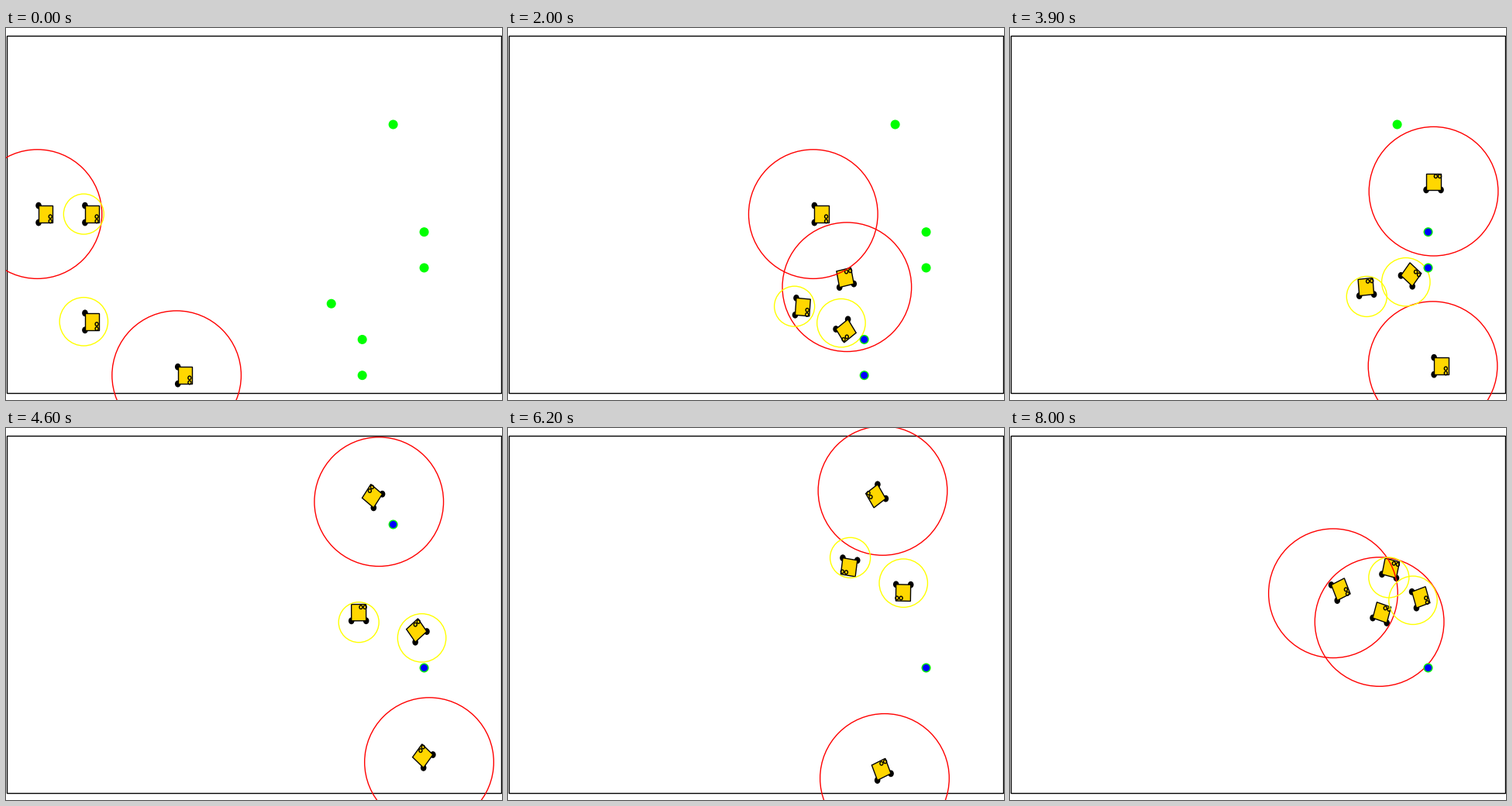
These frames come from a looping animation (640x480 px, 8100 ms). A matplotlib script:

```python
import matplotlib.pyplot as plt
import numpy as np
from matplotlib.animation import FuncAnimation
from matplotlib.patches import Circle, Ellipse, Polygon, Rectangle

FRAMES, INTERVAL = 81, 100
WIDTH, HEIGHT = 640, 480
SCALE = np.array([19.965, 23.12])  # pixels per world unit
LEFT, BOTTOM = 0.5, 8.7            # world origin in pixels
SCOUT_RING, PICKER_RINGS = 83.3, (26, 31.2)
LIME, BLUE, GOLD = "#00ff00", "#0000ff", "#ffd700"

# Each robot drives through one pose (x, y, heading in degrees) per key step.
KEY_STEPS = [0, 9, 20, 39, 54, 70, 80]
SCOUT_A = [(2, 10, 0), (10.28, 10, 0), (19.7, 10, 0), (27.35, 11.27, 90),
           (23.95, 18.09, 2), (21.13, 11.6, -80), (20.86, 11.16, 24)]
SCOUT_B = [(11, 1, 0), (18.56, 2.67, 90), (21.88, 5.93, 102), (27.3, 1.52, 0),
           (26.89, 1.73, -114), (23.37, 7.6, 90), (23.85, 9.57, 73)]
PICKER_A = [(5, 10, 0), (14.93, 10, 0), (18.49, 4.85, -4.5), (23.03, 5.4, 95),
            (22.78, 14.07, 91), (23.28, 10.96, 21), (24.46, 12.04, 77)]
PICKER_B = [(5, 4, 0), (14.84, 4, 0), (21.51, 3.92, -55), (25.56, 6.21, 51),
            (25.69, 12.1, 90), (26.21, 10.77, 20), (26.02, 10.77, 18)]

# Targets: position and the step at which a picker collects it
TARGETS = [((25, 15), 58), ((27, 9), 43), ((27, 7), FRAMES),
           ((21, 5), 14), ((23, 3), 22), ((23, 1), 26)]

fig = plt.figure(figsize=(WIDTH / 100, HEIGHT / 100), dpi=100, facecolor="white")
ax = fig.add_axes([0, 0, 1, 1])
ax.set_xlim(-LEFT / SCALE[0], (WIDTH - LEFT) / SCALE[0])
ax.set_ylim(-BOTTOM / SCALE[1], (HEIGHT - BOTTOM) / SCALE[1])
ax.axis("off")
ax.add_patch(Rectangle((0, 0.03), 31.96, 19.94, fill=False, ec="black", lw=1))


def round_mark(radius, center=(0, 0), **style):
    """A circle that is round on screen, with its radius in pixels."""
    return ax.add_patch(Ellipse(center, *(2 * radius / SCALE), lw=1, **style))


def direction(heading):
    return np.array([np.cos(np.radians(heading)), np.sin(np.radians(heading))])


class Robot:
    CORNERS = np.array([(0.08, -0.475), (1, -0.475), (1, 0.475), (0.08, 0.475)])
    WHEELS = CORNERS[[0, 3]]
    EYES = np.array([(0.84, -0.14), (0.84, -0.4)])

    def __init__(self, poses, radius, color):
        self.poses = poses
        self.wheels = [ax.add_patch(Circle((0, 0), 0.19, fc="black", ec="none"))
                       for _ in self.WHEELS]
        self.body = ax.add_patch(Polygon(self.CORNERS, fc=GOLD, ec="black", lw=1))
        self.eyes = [ax.add_patch(Circle((0, 0), 0.1, fill=False, ec="black", lw=1))
                     for _ in self.EYES]
        self.ring = round_mark(radius, fill=False, ec=color, zorder=1.5)

    def pose(self, step):
        """Position and forward vector on a cubic that leaves and arrives head-on."""
        leg = min(np.searchsorted(KEY_STEPS, step, "right"), len(KEY_STEPS) - 1) - 1
        start, end = KEY_STEPS[leg:leg + 2]
        (*p, a), (*q, b) = self.poses[leg:leg + 2]
        p, q = np.array(p), np.array(q)
        reach = min(end - start, 2.5 * np.linalg.norm(q - p))
        v, w = reach * direction(a), reach * direction(b)
        u = (step - start) / (end - start)
        quad, cube = 3 * (q - p) - 2 * v - w, 2 * (p - q) + v + w
        position = p + u * (v + u * (quad + u * cube))
        velocity = v + u * (2 * quad + 3 * u * cube)
        return position, velocity / np.linalg.norm(velocity)

    def move(self, step):
        position, (c, s) = self.pose(step)
        turn = np.array([(c, s), (-s, c)])
        self.body.set_xy(position + self.CORNERS @ turn)
        for disc, spot in zip(self.wheels + self.eyes,
                              np.vstack([self.WHEELS, self.EYES]) @ turn):
            disc.center = position + spot
        self.ring.center = position


def first_sighting(target, scouts):
    for step in range(FRAMES):
        for scout in scouts:
            offset = (scout.pose(step)[0] - target) * SCALE
            if np.hypot(*offset) < SCOUT_RING + 4:
                return step
    return FRAMES


scouts = [Robot(poses, SCOUT_RING, "red") for poses in (SCOUT_A, SCOUT_B)]
pickers = [Robot(poses, radius, "yellow")
           for poses, radius in zip((PICKER_A, PICKER_B), PICKER_RINGS)]
dots = [(round_mark(5.3, spot, ec=LIME, zorder=2), first_sighting(spot, scouts), collected)
        for spot, collected in TARGETS]


def update(step):
    for robot in scouts + pickers:
        robot.move(step)
    for dot, spotted, collected in dots:
        dot.set_facecolor(BLUE if step >= spotted else LIME)
        dot.set_visible(step < collected)
    return []


anim = FuncAnimation(fig, update, frames=FRAMES, interval=INTERVAL,
                     repeat=True, repeat_delay=0)
plt.show()
```
